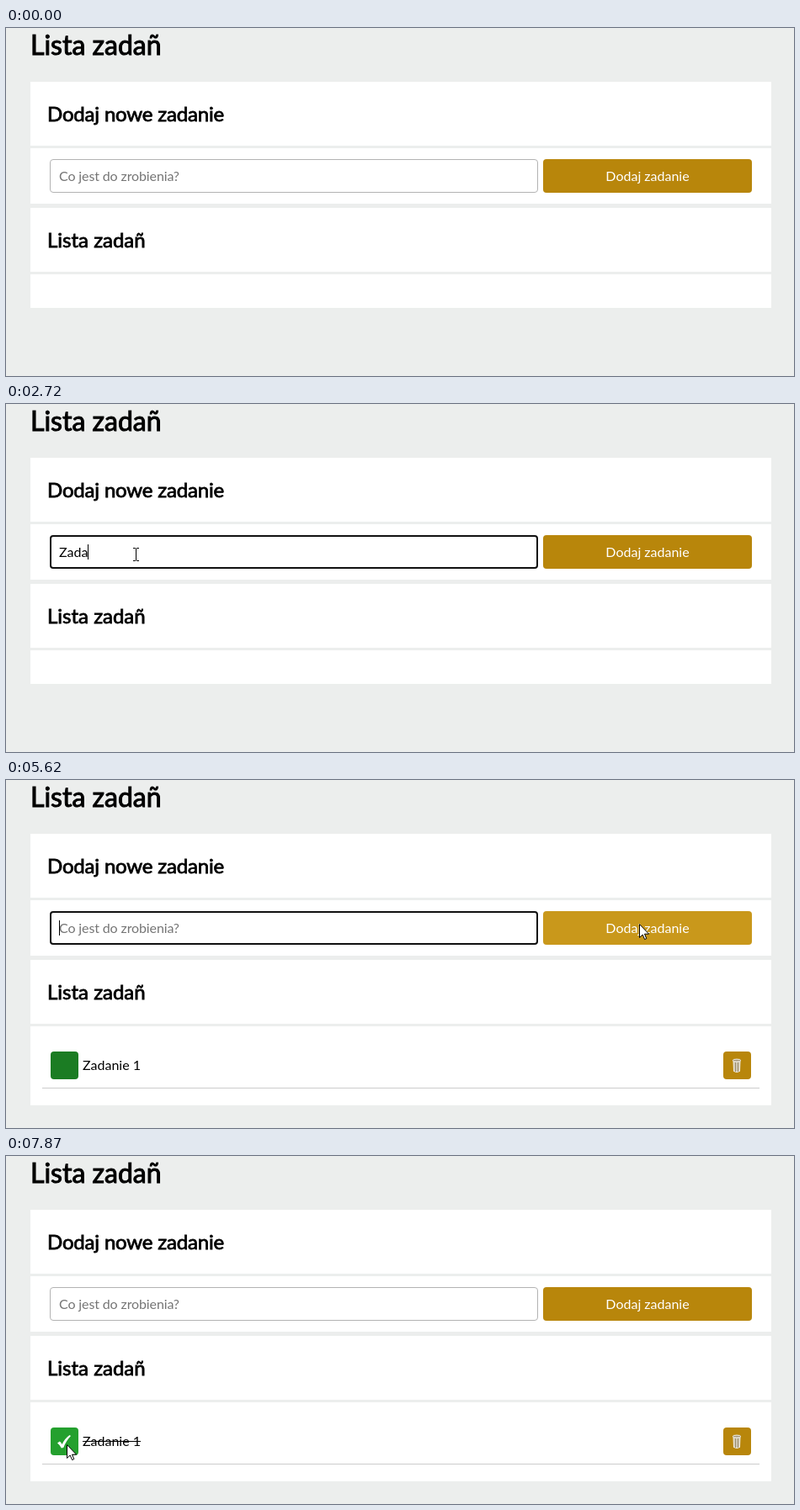
Animation, 936 px wide and 414 px high, one loop 8 s. Source, as an HTML page:

```html
<!DOCTYPE html>
<html lang="pl">
<head>
<meta charset="utf-8">
<title>Lista zadañ</title>
<style>
  html, body { margin: 0; width: 100%; height: 100%; overflow: hidden; background: #eceeed; }
  #stage { position: relative; width: 936px; height: 414px; overflow: hidden;
    font: 16px/40px Lato, sans-serif; color: #000; }
  #stage div, #stage svg { position: absolute; box-sizing: border-box; white-space: pre; }
  .panel { left: 29px; width: 880px; background: #fff; }
  .title { left: 29px; top: -4px; font-size: 32px; line-height: 48px; -webkit-text-stroke: 1px #000; }
  .head { left: 49px; font-size: 24px; line-height: 36px; -webkit-text-stroke: .8px #000; }
  .tight { letter-spacing: -.0075em; }
  .button { border-radius: 4px; background: #b8860b; color: #fff; text-align: center; }
  .icon { top: 323px; width: 33px; height: 33px; }
  .icon svg { left: 0; top: 0; }
  #field { left: 52px; top: 156px; width: 580px; height: 40px; border: 1px solid #b3b3b3; border-radius: 4px; background: #fff; }
  #field.focus { border: 2px solid #101010; }
  #entry { left: 63px; top: 156px; height: 40px; }
  #caret { position: absolute; top: 11px; width: 1px; height: 18px; background: #000; }
  #hint { color: #757575; }
  #add { left: 638px; top: 156px; width: 248px; height: 40px; }
  #add.hover { background: #c9981b; }
  #add.press { background: #d3a32a; }
  #tip { left: 162px; top: 193px; width: 106px; height: 25px; border: 1px solid #4a4a4a; background: #fff;
    padding-left: 7px; font: 11.5px/23px "Open Sans", "Noto Sans", sans-serif; color: #444; }
  #row { left: 0; top: 0; }
  #check { left: 53px; background: #1b7c23; }
  #check.hover { background: #24a02e; }
  #task { left: 91px; top: 319px; }
  #task.done { text-decoration: line-through; }
  #bin { left: 852px; }
  #rule { left: 43px; top: 366px; width: 852px; height: 1px; background: #ccc; }
  #arrow, #beam { left: 0; top: 0; overflow: visible; }
</style>
</head>
<body>
<div id="stage">
  <div class="title">Lista zadañ</div>
  <div class="panel" style="top:64px;height:76px"></div>
  <div class="panel" style="top:143px;height:66px"></div>
  <div class="panel" style="top:214px;height:76px"></div>
  <div class="panel" id="list" style="top:293px"></div>
  <div class="head tight" style="top:84px">Dodaj nowe zadanie</div>
  <div class="head" style="top:234px">Lista zadañ</div>
  <div id="field"></div>
  <div id="entry"><span id="typed"></span><span id="caret"></span><span id="hint" class="tight">Co jest do zrobienia?</span></div>
  <div id="add" class="button">Dodaj zadanie</div>
  <div id="row">
    <div id="check" class="button icon"><svg id="tick" width="33" height="33"><path fill="#fff" d="M8 18.5L10.8 16.6Q12.6 17.8 13.6 20Q17 12.8 22.6 9L24 10Q18.6 15.5 15.2 24L12.8 24.6Q10.8 20.5 8 18.5Z"/></svg></div>
    <div id="task">Zadanie 1</div>
    <div id="bin" class="button icon"><svg width="33" height="33">
      <path d="M12 11L12.5 23.5Q16 25.5 19.5 23.5L20 11Z" fill="#d0c8b4" stroke="#f2eee3"/>
      <path d="M14.5 13V24M17.5 13V24" stroke="#8f815e" stroke-width=".8"/>
      <ellipse cx="16" cy="10.6" rx="4.8" ry="1.5" fill="#a3967a" stroke="#f7f5ef"/>
    </svg></div>
    <div id="rule"></div>
  </div>
  <div id="tip">Wypełnij to pole.</div>
  <svg id="arrow" width="13" height="20"><path d="M.5 .6V16.5L4.2 13L6.6 18.6L8.8 17.6L6.5 12.2H11.6Z" fill="#fff" stroke="#000"/></svg>
  <svg id="beam" width="8" height="17"><path d="M0 .5H3M4 .5H7M0 15.5H3M4 15.5H7M3.5 1V15" fill="none" stroke="#000"/></svg>
</div>
<script>
const LOOP = 8000, STEP = 70;
const TASK = 'Zadanie 1', TYPE_START = 1850, KEY_GAP = 260;
const FOCUS = 1040, TIP = 1440, PRESS = 5490, ADD = 5620, BLUR = 7460, DONE = 7530;
const LAST_KEY = TYPE_START + (TASK.length - 1) * KEY_GAP;

// curved, decelerating pointer moves; each rests at its last point until "until"
const moves = [
  { at: 200, time: 770, until: 4660, from: [596, 398], bend: [200, 150], to: [154, 179], power: 2 },
  { at: 4660, time: 700, until: 6030, from: [430, 140], bend: [828, 67], to: [752, 171], power: 5 },
  { at: 6030, time: 70, until: 6170, from: [741, 222], bend: [535, 295], to: [330, 369], power: 1 },
  { at: 6700, time: 560, until: LOOP, from: [1, 379], bend: [29, 323], to: [72, 343], power: 1 }
];

const $ = id => document.getElementById(id);
const show = (id, on) => { $(id).style.display = on ? '' : 'none'; };
const mark = (id, name, on) => $(id).classList.toggle(name, on);
const clamp = (v, lo, hi) => Math.min(hi, Math.max(lo, v));

function pointer(t) {
  const m = moves.find(m => t >= m.at && t < m.until);
  if (!m) return null;
  const u = clamp(Math.floor((t - m.at) / STEP) * STEP / m.time, 0, 1);
  const p = 1 - (1 - u) ** m.power, q = 1 - p;
  return m.from.map((a, i) => Math.round(q * q * a + 2 * q * p * m.bend[i] + p * p * m.to[i]));
}

function over(p, id) {
  const el = $(id);
  const x = el.offsetLeft, y = el.offsetTop;
  return !!p && p[0] >= x && p[0] < x + el.offsetWidth && p[1] >= y && p[1] < y + el.offsetHeight;
}

// the caret restarts its blink at every click or key
function caretVisible(t, keys) {
  const typing = TYPE_START + (keys - 1) * KEY_GAP;
  const since = t >= ADD ? ADD : keys ? Math.min(typing, LAST_KEY) : FOCUS;
  return (t - since) % 1000 < 500;
}

function draw(t) {
  const p = pointer(t);
  const added = t >= ADD, done = t >= DONE;
  const pressed = t >= PRESS && !added;
  const focused = t >= FOCUS && t < BLUR && !pressed;
  const keys = added ? 0 : clamp(Math.floor((t - TYPE_START) / KEY_GAP) + 1, 0, TASK.length);

  $('typed').textContent = TASK.slice(0, keys);
  show('hint', !keys);
  show('caret', focused && caretVisible(t, keys));
  mark('field', 'focus', focused);
  show('tip', t >= TIP && t < TIP + 2 * STEP);

  show('row', added);
  $('list').style.height = added ? '94px' : '40px';
  mark('add', 'hover', over(p, 'add'));
  mark('add', 'press', pressed);
  mark('check', 'hover', over(p, 'check'));
  show('tick', done);
  mark('task', 'done', done);

  const text = over(p, 'field');
  show('arrow', p && !text);
  show('beam', text);
  if (p) {
    $('arrow').style.transform = `translate(${p[0]}px,${p[1]}px)`;
    $('beam').style.transform = `translate(${p[0] - 3}px,${p[1] - 8}px)`;
  }
}

const begin = performance.now();
function frame() {
  draw((performance.now() - begin) % LOOP);
  requestAnimationFrame(frame);
}
frame();
</script>
</body>
</html>
```
